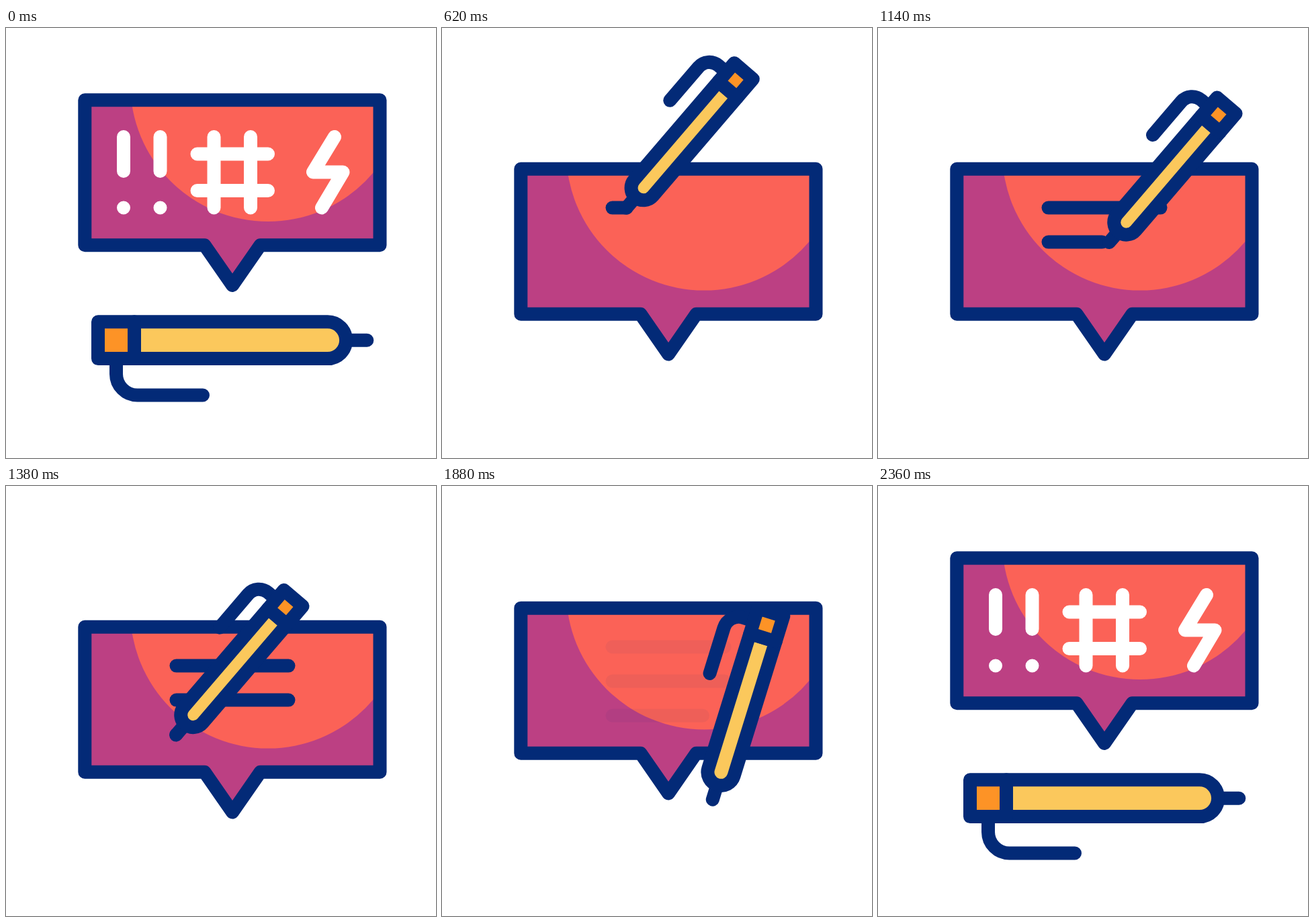
These frames come from a looping animation (640 by 640 pixels, 2400 ms). An HTML page:

```html
<!DOCTYPE html>
<html lang="en">
<head>
<meta charset="utf-8">
<title>Pen and speech bubble</title>
<style>
  html, body { margin: 0; width: 100%; height: 100%; overflow: hidden; background: #fff; }
  svg { display: block; width: 100%; height: 100%; }
  path, line { stroke-width: 20; stroke-linecap: round; stroke-linejoin: round; }
  .ink { stroke: #032a77; fill: none; }
  .white { stroke: #fff; fill: none; }
  #pen path { vector-effect: non-scaling-stroke; }
</style>
</head>
<body>
<svg viewBox="0 0 640 640">
  <defs>
    <path id="outline" d="M117.3 107.2H556.5V323.2H378.5L337 383L295.5 323.2H117.3Z"/>
    <clipPath id="inside"><use href="#outline"/></clipPath>
  </defs>
  <g id="bubble">
    <g clip-path="url(#inside)">
      <rect x="107" y="97" width="460" height="300" fill="#bc4083"/>
      <circle cx="390" cy="83" r="205" fill="#fb6257"/>
    </g>
    <use href="#outline" class="ink"/>
    <path id="symbols" class="white" d="M175 162V213M175 267.5h.01M229.5 162V213M229.5 267.5h.01
      M309.5 162V267.5M364 162V267.5M284.5 187.5H390M284.5 242H390
      M489 162L457 214.5H501.5L470 267.5"/>
    <g id="lines" class="ink">
      <line x1="253.5" y1="165" y2="165"/>
      <line x1="253.5" y1="216" y2="216"/>
      <line x1="253.5" y1="267.3" y2="267.3"/>
    </g>
  </g>
  <g id="pen" class="ink">
    <path d="M164 492V515A31.5 31.5 0 0 0 195.5 546.5H293M506 464.7H537.3"/>
    <path fill="#fbc85c" d="M191 437.3H478.7A27.4 27.4 0 0 1 478.7 492.1H191Z"/>
    <path fill="#fd9326" d="M137 437.3H191V492.1H137Z"/>
  </g>
</svg>
<script>
const LOOP = 2400, DROP = 102.6;
const [bubble, symbols, lines, pen] =
  ["bubble", "symbols", "lines", "pen"].map(id => document.getElementById(id));

const ramp = (t, from, to) => Math.min(1, Math.max(0, (t - from) / (to - from)));
const smooth = u => u * u * (3 - 2 * u);
const mix = (a, b, u) => a + (b - a) * u;

// Eased value between [time, value] keys
function track(t, keys) {
  let value = keys[0][1];
  for (let i = 1; i < keys.length; i++)
    value = mix(value, keys[i][1], smooth(ramp(t, keys[i - 1][0], keys[i][0])));
  return value;
}

const writeX = [[545, 0], [885, 167], [982, 0], [1282, 167], [1380, 0], [1700, 134.5]];
const writeY = [[885, 0], [982, 51.3], [1282, 51.3], [1380, 102.8]];
const strokes = [[545, 885, 167], [1000, 1290, 167], [1380, 1700, 134.5]];

function draw(t) {
  const leave = ramp(t, 1700, 2360);
  const away = ramp(t, 40, 545) * (1 - leave);
  const turn = t < 1700 ? away : 1 - leave ** 1.33;

  bubble.setAttribute("transform", `translate(0 ${DROP * away})`);
  symbols.style.opacity = 1 - ramp(t, 40, 230) + ramp(t, 1890, 2080);
  lines.style.opacity = 1 - ramp(t, 1700, 1890);
  strokes.forEach(([from, to, length], i) => {
    const line = lines.children[i];
    line.setAttribute("x2", 253.5 + length * smooth(ramp(t, from, to)));
    line.style.display = t > from ? "" : "none";
  });

  const x = mix(337, 326.5 + track(t, writeX), away);
  const y = mix(492, 154 + track(t, writeY), away);
  pen.setAttribute("transform",
    `translate(${x} ${y}) rotate(${130.6 * turn}) scale(${1 - 0.33 * turn}) translate(-337 -492)`);
}

function tick() {
  draw(performance.now() % LOOP);
  requestAnimationFrame(tick);
}
tick();
</script>
</body>
</html>
```
